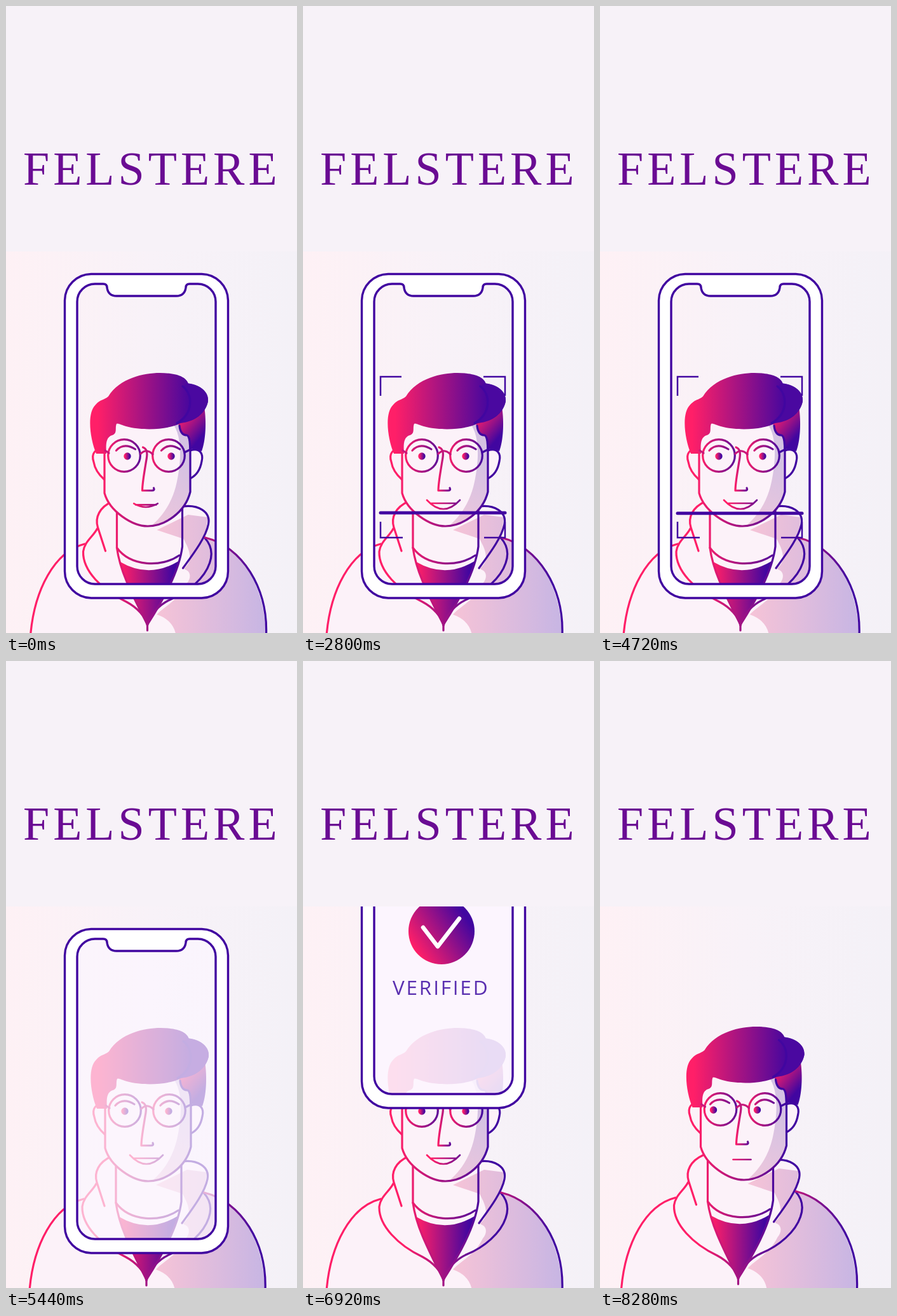
Write an HTML page that moves like this. It is 458 by 986 pixels and loops after 8320 ms.

```html
<!DOCTYPE html>
<html lang="en">
<head>
<meta charset="utf-8">
<title>Face check</title>
<style>
  html, body { margin: 0; width: 100%; height: 100%; overflow: hidden; background: #f7f2f8; }
  svg { display: block; width: 458px; height: 986px; }
  .line { fill: none; stroke-width: 3.2; stroke-linecap: round; stroke-linejoin: round; }
  .brand { font: 74px "Liberation Serif", serif; letter-spacing: 6px; fill: #6a0b93; }
  .label { font: 500 31.5px "Open Sans", sans-serif; letter-spacing: 2.8px; fill: #5a2fb0; }
</style>
</head>
<body>
<svg viewBox="0 0 458 986">
  <defs>
    <linearGradient id="ramp"><stop stop-color="#ff1f68"/><stop offset="1" stop-color="#4106a0"/></linearGradient>
    <g id="ramps"></g>
    <linearGradient id="wall">
      <stop stop-color="#fef1f5"/><stop offset=".5" stop-color="#f8f2f8"/><stop offset="1" stop-color="#f4f1f7"/>
    </linearGradient>
    <linearGradient id="coatShade" gradientUnits="userSpaceOnUse" x1="240" x2="400" y1="0" y2="0">
      <stop stop-color="#f5c3d7"/><stop offset="1" stop-color="#c9b6e3"/>
    </linearGradient>
    <linearGradient id="faceShade" gradientUnits="userSpaceOnUse" x1="236" y1="810" x2="285" y2="720">
      <stop stop-color="#ecc6dc"/><stop offset="1" stop-color="#d5c2e3"/>
    </linearGradient>
    <linearGradient id="badgeFill" href="#ramp" x1=".08" y1=".75" x2=".85" y2=".25"/>
    <linearGradient id="sideFill" href="#ramp" gradientUnits="userSpaceOnUse" x1="272" y1="648" x2="308" y2="678"/>
    <clipPath id="scene"><rect y="386" width="458" height="600"/></clipPath>
  </defs>

  <rect width="458" height="986" fill="#f7f2f8"/>
  <text class="brand" x="27" y="280.5">FELSTERE</text>

  <g clip-path="url(#scene)">
    <rect y="386" width="458" height="600" fill="url(#wall)"/>

    <g id="torso">
      <path fill="#fcf2f9" d="M37 1010C41 915 75 858 122 846C125 838 135 832 142 822C138 800 150 786 166 779L278 787C305 784 322 798 317 820L312 836C370 850 411 915 408 1010Z"/>
      <path fill="url(#coatShade)" d="M236 824L278 838C284 850 290 860 287 873C284 882 277 884 280 886C290 889 290 900 283 908C270 935 246 945 236 957C252 962 264 974 266 990V1010H408C411 915 370 850 312 836L316 804L285 800Z"/>
      <path fill="url(#shirt)" d="M178 874Q224 901 270 873C262 905 243 940 221 973C200 938 184 900 178 874Z"/>
      <g class="line" stroke="url(#body)">
        <path d="M173 788V852C178 890 198 927 221 973"/>
        <path d="M276 787V850C271 890 245 935 221 973V982"/>
        <path d="M173 852C195 882 244 883 271 864"/>
        <path d="M166 779C146 788 138 804 143 820L155 857"/>
        <path d="M142 822C136 834 122 842 120 858C119 888 150 919 188 937C205 946 218 960 221 974"/>
        <path d="M277 787C301 784 321 795 317 815C313 836 293 862 277 884"/>
        <path d="M311 836C322 848 324 862 319 876C311 900 285 922 258 933C240 941 226 956 221 974"/>
      </g>
      <g class="line" stroke="url(#coat)">
        <path d="M37 1010V990C43 918 75 858 122 846"/>
        <path d="M312 836C370 850 411 915 408 990V1010"/>
      </g>
    </g>

    <g id="head">
      <g class="line" stroke="url(#face)">
        <path fill="#fcf2f9" d="M157 699C140 694 135 705 139 717C141 730 148 738 156 745"/>
        <path fill="#fcf2f9" d="M291 699C306 694 312 704 309 716C307 728 301 738 291 743"/>
      </g>
      <path fill="#fcf2f9" d="M156 650V766C164 795 200 818 224 818C250 818 283 797 291 764V650Z"/>
      <path fill="url(#faceShade)" d="M262 655C280 676 276 720 270 748C263 782 246 804 229 818C255 816 284 796 291 764V660Z"/>
      <path class="line" stroke="url(#face)" d="M156 690V766C164 795 200 818 224 818C250 818 283 797 291 764V690"/>
      <path fill="url(#sideFill)" d="M272 655C274 668 278 676 286 675C291 678 290 688 291 696L309 700C315 685 317 655 313 630C305 646 290 655 272 655Z"/>
      <path fill="url(#hair)" d="M159 704H143C133 680 128 640 142 627C150 618 155 620 162 614C180 585 218 577 243 577C264 577 284 581 288 594C310 596 320 610 319 622C315 640 300 653 276 656C255 667 215 668 190 661C182 659 178 656 175 657C172 664 177 672 168 675C158 678 158 690 159 704Z"/>
      <path fill="#4a08a0" d="M286 593C309 596 320 608 319 621C316 640 297 655 270 656C292 645 302 618 279 599Z"/>
      <path class="line" stroke="#4106a0" d="M279 598C296 611 296 641 270 656M274 660C275 670 279 675 286 675C291 678 290 688 291 697"/>

      <g class="line">
        <circle cx="187" cy="707" r="25.3" stroke="url(#lensL)"/>
        <circle cx="257" cy="707" r="25.3" stroke="url(#lensR)"/>
        <path stroke="#c8167a" d="M213 704Q222 695 232 705M157 699L163 703"/>
        <path stroke="#4106a0" d="M282 702L292 697"/>
      </g>
      <g id="nose" class="line">
        <path stroke="url(#noseLine)" d="M214 694C222 697 221 706 219 716C216 735 213 750 213 762H228Q233 762 231 758"/>
        <path stroke="url(#lensL)" d="M172 699Q184 686 202 697"/>
        <path stroke="url(#lensR)" d="M243 699Q255 686 272 697"/>
      </g>
      <g id="eyes">
        <circle cx="187" cy="708" r="5.7" fill="url(#eyeL)"/>
        <circle cx="256" cy="708" r="5.7" fill="url(#eyeR)"/>
      </g>
      <path id="mouth" class="line" style="stroke-width:2.7" stroke="url(#lips)"/>
    </g>

    <g id="scan" fill="none" stroke="#4106a0">
      <path stroke-width="2.5" d="M122 613V583H155M284 583H318V613M122 811V836H157M285 836H318V811"/>
      <path id="beam" stroke-width="5" stroke-linecap="round" d="M122 0H318"/>
    </g>

    <g id="phone">
      <path id="veil" fill="#fdf7ff"/>
      <path id="shell" fill="#fff" fill-rule="evenodd" stroke="#4106a0" stroke-width="3.4"/>
      <g id="badge">
        <circle cx="218" cy="653" r="52" fill="url(#badgeFill)"/>
        <path id="tick" fill="none" stroke="#fff" stroke-width="6.5" stroke-linecap="round" stroke-linejoin="round" pathLength="100" d="M189 647L212 677L246 633"/>
      </g>
      <text id="label" class="label" x="141" y="753">VERIFIED</text>
    </g>
  </g>
</svg>

<script>
const LOOP = 8320, STEP = 40;
const $ = id => document.getElementById(id);
const set = (id, name, value) => $(id).setAttribute(name, value);

// Horizontal pink-to-violet ramps: name, start x, end x
const spans = [
  ['body', 160, 285], ['coat', 270, 390], ['face', 150, 291], ['shirt', 180, 262],
  ['hair', 145, 296], ['lensL', 160, 222], ['lensR', 228, 284], ['noseLine', 212, 236],
  ['eyeL', 183, 191], ['eyeR', 252, 260], ['lips', 202, 262]
];
for (const [id, x1, x2] of spans) {
  const g = document.createElementNS('http://www.w3.org/2000/svg', 'linearGradient');
  const attrs = { id, x1, x2, y1: 0, y2: 0, href: '#ramp', gradientUnits: 'userSpaceOnUse' };
  for (const k in attrs) g.setAttribute(k, attrs[k]);
  $('ramps').append(g);
}

const screenPath = 'M140 437H153Q159 437 159 443Q161 456 174 456H268Q281 456 283 443Q283 437 289 437H302' +
  'A28 28 0 0 1 330 465V881A28 28 0 0 1 302 909H140A28 28 0 0 1 112 881V465A28 28 0 0 1 140 437Z';
set('veil', 'd', screenPath);
set('shell', 'd', 'M134 421.5H308A42 42 0 0 1 349.5 463V889A42 42 0 0 1 308 931H134' +
  'A42 42 0 0 1 92.5 889V463A42 42 0 0 1 134 421.5Z' + screenPath);

const smooth = p => (1 - Math.cos(Math.PI * p)) / 2;
const sweep = p => p + (smooth(p) - p) * .35;
const part = (t, a, b) => Math.min(1, Math.max(0, (t - a) / (b - a)));
const mix = (a, b, p) => a + (b - a) * p;

// time, body y, torso x, head x, eyes x, nose x, smile
const poses = [
  [0, 0, 1.5, -1, 5, 2.5, .4],
  [1480, 0, 1.5, -1, 5, 2.5, .4],
  [2320, 0, 0, 0, 0, 0, 1],
  [7000, 0, 0, 0, 0, 0, 1],
  [7680, 16, .5, 0, -1, 0, 0],
  [7760, 16, .5, 0, -1, 0, 0],
  [8280, -2, -3.5, 2.5, -11, -1, 0],
  [LOOP, -2, -3.5, 2.5, -11, -1, 0]
];

function pose(t) {
  const i = poses.findIndex(k => k[0] > t), a = poses[i - 1], b = poses[i];
  const p = smooth(part(t, a[0], b[0]));
  return a.slice(1).map((v, j) => mix(v, b[j + 1], p));
}

const move = (id, x, y) => set(id, 'transform', `translate(${x} ${y})`);

function draw(t) {
  const [y, torso, head, eyes, nose, m] = pose(t);
  move('torso', torso, y);
  move('head', head, y);
  move('eyes', eyes, 0);
  move('nose', nose, 0);
  const lip = 786 - 9 * m;
  set('mouth', 'd', `M${207 - 12 * m} ${lip}Q221 ${786 + 19 * m} ${235 + 12 * m} ${lip}` +
    `M${207 - 5 * m} ${786 - 4 * m}H${235 + 6 * m}`);

  const up = sweep(part(t, 2640, 3560)), down = sweep(part(t, 3940, 4880));
  set('scan', 'opacity', part(t, 2320, 2600) * (1 - part(t, 5000, 5280)));
  move('beam', 0, 825 - 201.5 * (up - down));

  const grow = smooth(part(t, 5560, 6000));
  set('veil', 'opacity', .89 * smooth(part(t, 5000, 5640)));
  set('badge', 'opacity', part(t, 5560, 5720));
  set('badge', 'transform', `translate(218 653) scale(${grow}) translate(-218 -653)`);
  const drawn = smooth(part(t, 5880, 6280));
  set('tick', 'stroke-dasharray', `${100 * drawn} 200`);
  set('tick', 'opacity', drawn ? 1 : 0);
  set('label', 'opacity', part(t, 5840, 6240));

  move('phone', 0, -228 * (Math.max(0, t - 6600) / 320) ** 2);
}

const start = performance.now();
function tick() {
  const t = (performance.now() - start) % LOOP;
  draw(Math.floor(t / STEP) * STEP);
  requestAnimationFrame(tick);
}
tick();
</script>
</body>
</html>
```
